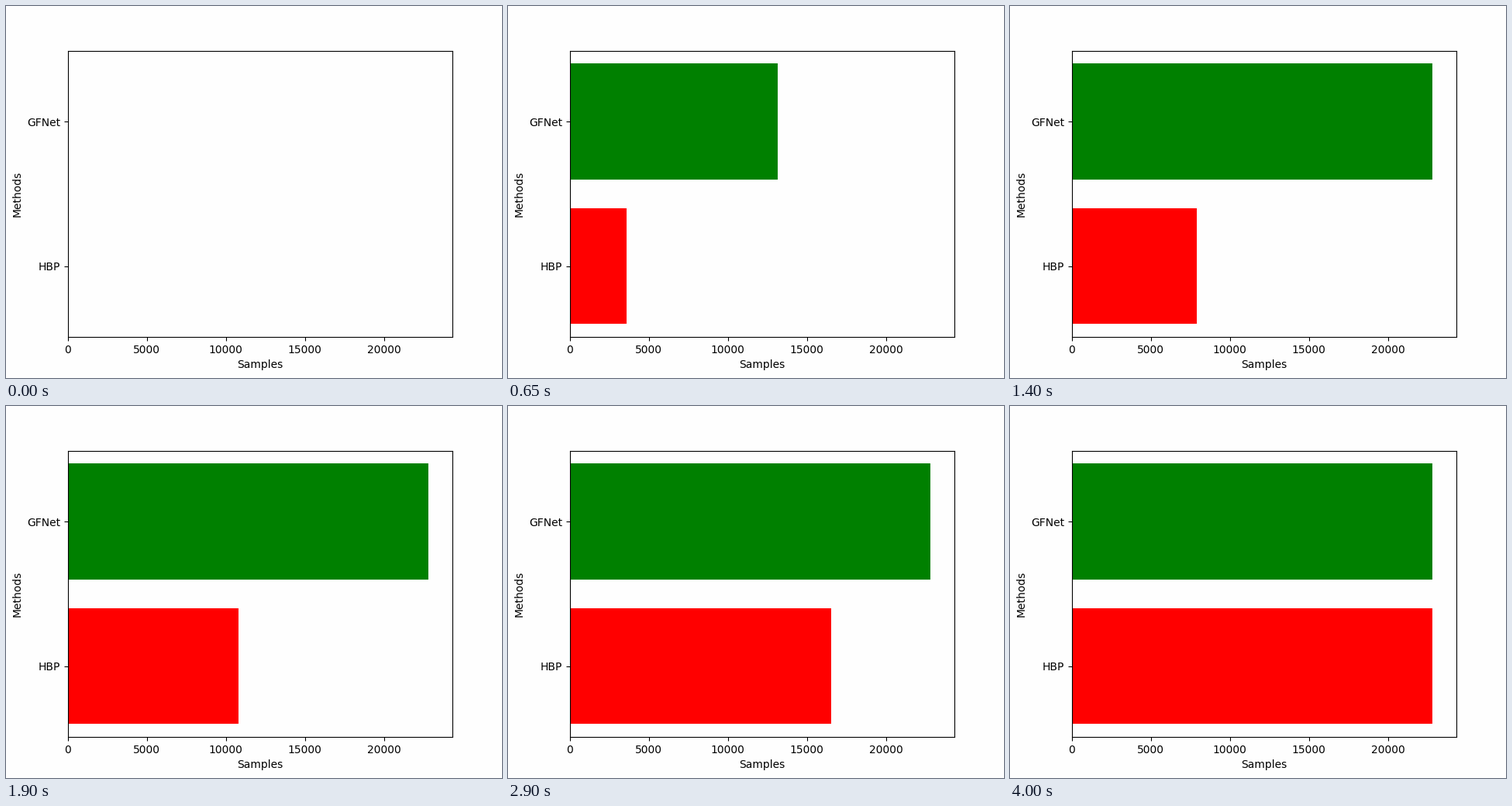
These frames come from a looping animation (640 by 480 pixels, 5000 ms). A matplotlib script:

```python
import numpy as np
import matplotlib.pyplot as plt
from matplotlib.animation import FuncAnimation

FRAMES, INTERVAL = 100, 50
TOTAL, X_MAX = 22810, 24330
BACKGROUND = "#fefefe"

# method: (samples per frame, start delay in frames, colour)
METHODS = {"HBP": (287, 0.45, "red"), "GFNet": (1035, 0.28, "green")}


def samples(rate, delay, frame):
    return np.clip(rate * (frame - delay), 0, TOTAL)


plt.rcParams["font.family"] = "DejaVu Sans"
fig, ax = plt.subplots(figsize=(6.4, 4.8), dpi=100, facecolor=BACKGROUND)
fig.subplots_adjust(left=0.125, right=0.9, bottom=0.11, top=0.88)
ax.set_facecolor(BACKGROUND)
bars = ax.barh(list(METHODS), [0] * len(METHODS), height=0.8,
               color=[color for *_, color in METHODS.values()])
ax.set_xlim(0, X_MAX)
ax.set_ylim(-0.49, 1.49)
ax.set_xlabel("Samples")
ax.set_ylabel("Methods")


def update(frame):
    for bar, (rate, delay, _) in zip(bars, METHODS.values()):
        bar.set_width(samples(rate, delay, frame))
    return list(bars)


anim = FuncAnimation(fig, update, frames=FRAMES, interval=INTERVAL,
                     init_func=lambda: update(0), repeat=True, repeat_delay=0)
plt.show()
```
